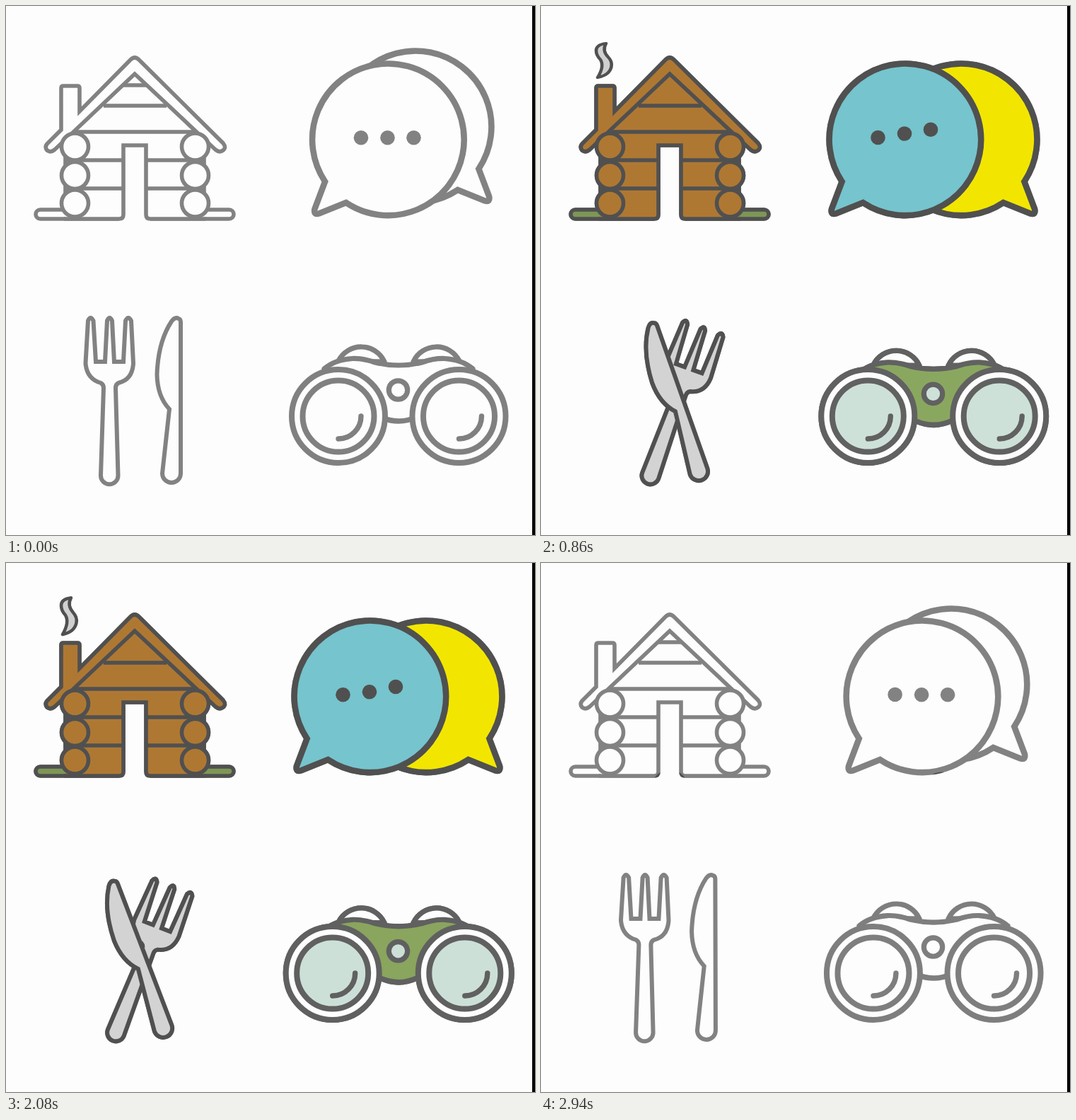
An HTML page for the animation above (2.96 s loop, 748x748 px).

```html
<!DOCTYPE html>
<html lang="en">
<head>
<meta charset="utf-8">
<title>Camp icons</title>
<style>
  html, body { margin: 0; width: 100%; height: 100%; overflow: hidden; background: #fdfdfd; }
  svg { display: block; width: 100vw; height: 100vh; }
</style>
</head>
<body>
<svg id="stage" viewBox="0 0 748 748"></svg>
<script>
const PAPER = '#fdfdfd', GRAY = '#828282', DARK = '#505050';
const stage = document.getElementById('stage');

const path = (d, fill = 'none', extra = '') => `<path d="${d}" fill="${fill}" ${extra}/>`;
const circle = (x, y, r, fill = 'none', extra = '') =>
  `<circle cx="${x}" cy="${y}" r="${r}" fill="${fill}" ${extra}/>`;

// Each icon is drawn twice: plain, and in colour behind a growing circle.
function house(tint, colored) {
  const wood = tint('#ae7833'), grass = tint('#7d9656');
  const logs = [97.5, 267.5].flatMap(x => [199, 239.5, 279].map(y => circle(x, y, 19, wood)));
  return `<g stroke-width="5.6">
    ${path('M100 288H48.5a6.5 6.5 0 0 0 0 13H160', grass)}
    ${path('M265 288H315.5a6.5 6.5 0 0 1 0 13H204', grass)}
    ${path('M84 178H280V301H204Q198 301 198 295V197H166V295Q166 301 160 301H84Z', wood, 'stroke="none"')}
    ${path('M82 301H160Q166 301 166 295V197H198V295Q198 301 204 301H282')}
    ${path('M84 218H166M198 218H280M84 258H166M198 258H280M84 208V270M280 208V270')}
    ${path('M182 95L92 178H272Z', wood)}
    ${path('M138 141H227')}${colored ? '' : path('M164 112H201')}
    ${path('M176 76Q182 70 188 76L307 194Q312 200 307 204Q302 208 296 203L182 96L69 203Q63 208 58 204Q54 199 59 194' +
      'L78 175V116Q78 113 81 113H101Q104 113 104 116V149Z', wood)}
    ${logs.join('')}
    ${colored ? path('M92 44Q78 46 78 56Q78 64 84 71Q90 82 80 101Q97 97 99.5 83Q101 74 95 67Q86 56 92 44Z',
      '#d0d0d0', 'class="smoke" stroke-width="4.6" stroke-linejoin="round"') : ''}
  </g>`;
}

function chat(tint, colored) {
  const bubble = 'M455.4 278.1L417 293.5Q409 296 411 287L425.6 248.3A107.3 107.3 0 1 1 455.4 278.1Z';
  const ink = colored ? DARK : GRAY;
  const dots = [476.5, 514, 551].map((x, i) => circle(x, 186.3, 10.3, ink, `class="dot${i}" stroke="none"`));
  return `<g stroke-width="8.6">
    <g class="back">${path(bubble, tint('#f2e600'), 'transform="matrix(-1 0 0 1 1109 0)"')}</g>
    <g class="front">${path(bubble, tint('#76c4cd'))}${dots.join('')}</g>
  </g>`;
}

function cutlery(tint) {
  const steel = tint('#d3d3d3');
  return `<g stroke-width="6">
    ${path('M116 445Q119.5 437 123.5 445L127 503H140L143 445Q146.5 437 150 445L153 503H166L169 445Q173 437 177 445' +
      'L180 505Q179 528 159 533Q155 535 155 540L158.5 664A12.2 12.2 0 0 1 134 664L138 540Q138 535 134 533Q114 527 112.5 505Z',
      steel, 'class="fork"')}
    ${path('M247 447V661A13 13 0 0 1 221 661L231 570Q214 552 213.5 521Q215 475 234 446Q239 439 244 442Q247 443 247 447Z',
      steel, 'class="knife"')}
  </g>`;
}

function binoculars(tint) {
  const glass = tint('var(--glass)');
  const eyepiece = 'M470 502A36 36 0 0 1 535 503Z';
  const lens = (x, name) => `<g class="${name}">
    ${circle(x, 580, 66, PAPER)}${circle(x, 580, 50.5, glass)}
    ${path(`M${x + 32} 580a32 32 0 0 1 -32 32`, 'none', 'stroke-width="7.4"')}</g>`;
  return `<g stroke-width="8" style="stroke:var(--rim)" stroke-linejoin="round" stroke-linecap="round">
    <g class="bridge" stroke-width="7.2">
      ${path(eyepiece, PAPER)}${path(eyepiece, PAPER, 'transform="matrix(-1 0 0 1 1111 0)"')}
      ${path('M450 513Q465 500 490 498.5Q505 498 522 504Q555 512 588 504Q605 498 620 498.5Q645 500 660 513L610 560Q555 614 500 560Z',
        tint('var(--green)'))}
      ${circle(554.5, 543, 13.2, glass)}
    </g>
    ${lens(470, 'left')}${lens(640.5, 'right')}
  </g>`;
}

// Reveal circles: centre x, then [start, change per step] for centre y and radius.
const icons = [
  { draw: house, x: 182, y: [326, -7.9], r: [15, 10.9] },
  { draw: chat, x: 566, y: [328, -10.2], r: [9, 13.4] },
  { draw: cutlery, x: 191, y: [780, -13.8], r: [-38, 18.3] },
  { draw: binoculars, x: 554, y: [690, -9.3], r: [-6, 11.5] }
];

stage.innerHTML = `<rect width="748" height="748" fill="${PAPER}"/>` + icons.map((icon, i) => `
  <clipPath id="reveal${i}">${circle(icon.x, 0, 0)}</clipPath>
  <g stroke="${GRAY}">${icon.draw(() => PAPER, false)}</g>
  <g stroke="${DARK}" clip-path="url(#reveal${i})">${icon.draw(c => c, true)}</g>`).join('') +
  '<rect x="744" width="4" height="748"/>';

const reveals = icons.map((_, i) => stage.querySelector(`#reveal${i} circle`));
const parts = {};
for (const name of ['smoke', 'back', 'front', 'dot0', 'dot1', 'dot2', 'fork', 'knife', 'bridge', 'left', 'right'])
  parts[name] = stage.querySelectorAll('.' + name);

const place = (name, transform) => parts[name].forEach(el => el.setAttribute('transform', transform));
const clamp = v => Math.min(1, Math.max(0, v));
const smooth = v => (v = clamp(v), v * v * (3 - 2 * v));
const mix = (a, b, k) => `rgb(${a.map((v, i) => Math.round(v + (b[i] - v) * k))})`;

// Slow start, quick crossing, slow settle.
const swingKeys = [[0, 0], [7, .04], [13, .13], [14, .19], [18, .71], [20, .83], [25, .925], [29, .98], [32, 1]];
function swing(step) {
  const i = Math.max(1, swingKeys.findIndex(([at]) => at >= step));
  const [a, from] = swingKeys[i - 1], [b, to] = swingKeys[i];
  return from + (to - from) * (step - a) / (b - a);
}

// Steps come in threes lasting 20, 100 and 20 ms; the motion runs out and back.
function stepAt(time) {
  const t = time % 2960, rest = t % 140;
  const n = 3 * Math.floor(t / 140) + (rest >= 20) + (rest >= 120);
  return n <= 32 ? n : 64 - n;
}

function render(time) {
  const step = stepAt(time), p = swing(step), u = step / 32;

  icons.forEach(({ y, r }, i) => {
    reveals[i].setAttribute('cy', y[0] + y[1] * step);
    reveals[i].setAttribute('r', step ? Math.max(0, r[0] + r[1] * step) : 0);
  });

  const rise = .2 + .8 * Math.sin(clamp((step - 13) / 10) * Math.PI / 2);
  place('smoke', `translate(0 ${102 * (1 - rise)}) scale(1 ${rise})`);
  parts.smoke.forEach(el => el.setAttribute('opacity', clamp((step - 12) / 6)));

  const apart = 1 - smooth(step / 7);
  place('back', `translate(${-15 * apart} ${-18 * apart})`);
  place('front', `translate(${25.5 * apart} 0)`);
  [10, 14, 19].forEach((peak, i) => {
    const d = Math.min(1, Math.abs(step - peak) / 10);
    place('dot' + i, `translate(0 ${-5.8 * (1 + Math.cos(Math.PI * d))})`);
  });

  place('fork', `translate(${11 * p} 0) rotate(${25.6 * p} 146 664)`);
  place('knife', `translate(${-13 * p} ${-4 * p}) rotate(${-25.2 * p} 234 664)`);

  place('bridge', `translate(0 ${7 * p})`);
  place('left', `translate(${-10 * p} 0)`);
  place('right', `translate(${10 * p} 0)`);
  const shade = u * (1.2 - .2 * u);
  stage.style.setProperty('--rim', mix([128, 128, 128], [80, 80, 80], shade));
  stage.style.setProperty('--green', mix([168, 200, 120], [122, 148, 82], shade));
  stage.style.setProperty('--glass', mix([236, 246, 240], [188, 213, 203], shade));
}

const start = performance.now();
function tick() {
  render(performance.now() - start);
  requestAnimationFrame(tick);
}
tick();
</script>
</body>
</html>
```
